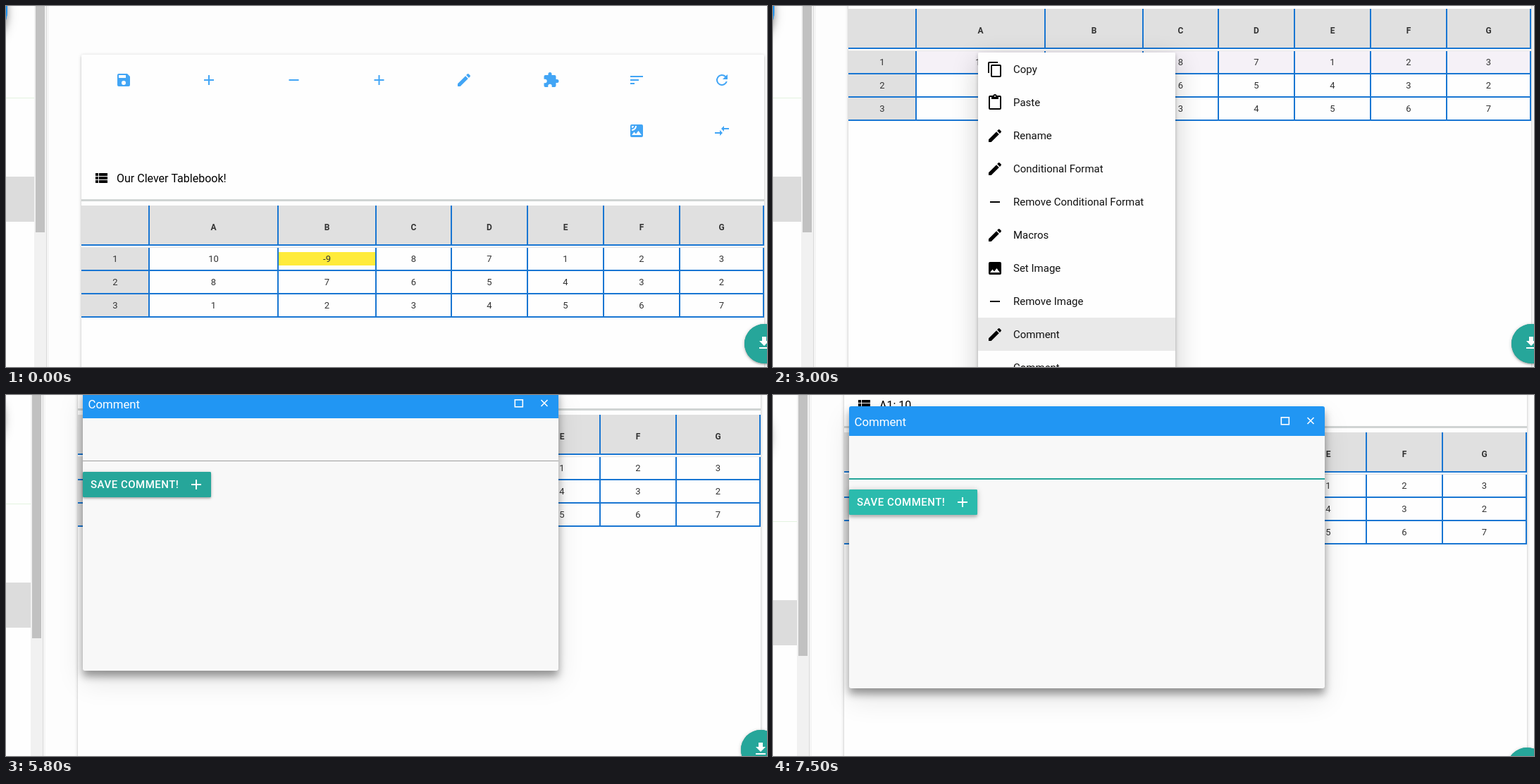
An HTML page with a canvas for the animation above (8 s loop, 1080 by 512 pixels).

```html
<!DOCTYPE html>
<html lang="en">
<head>
<meta charset="utf-8">
<title>Worksheet comment</title>
<style>
html, body { margin: 0; width: 100%; height: 100%; overflow: hidden; background: #fdfdfd; }
canvas { display: block; }
</style>
</head>
<body>
<canvas id="stage" width="1080" height="512"></canvas>
<script>
const ctx = document.getElementById('stage').getContext('2d');
const LOOP = 8000;
const BLUE = '#1976d2', TEAL = '#26a69a', GREY = '#e0e0e0';

// Icons on a 24 unit grid, filled with the even-odd rule
const SQUARE = 'M5 3h14a2 2 0 012 2v14a2 2 0 01-2 2H5a2 2 0 01-2-2V5a2 2 0 012-2z';
const HILLS = 'M8.5 13.5L5 18h14l-4.5-6-3.5 4.5z';
const icons = {
  save: 'M3 5a2 2 0 012-2h12l4 4v12a2 2 0 01-2 2H5a2 2 0 01-2-2zM5 5v4h10V5zM12 13a3 3 0 100 6 3 3 0 000-6z',
  add: 'M19 13h-6v6h-2v-6H5v-2h6V5h2v6h6z',
  remove: 'M19 13H5v-2h14z',
  edit: 'M3 17.3V21h3.7L17.8 9.9l-3.7-3.7zM20.7 7a1 1 0 000-1.4l-2.3-2.3a1 1 0 00-1.4 0l-1.9 1.8 3.8 3.8z',
  puzzle: 'M20.5 11H19V7a2 2 0 00-2-2h-4V3.5a2.5 2.5 0 00-5 0V5H4a2 2 0 00-2 2v3.8h1.5a2.7 2.7 0 010 5.4H2V20a2 2 0 002 2h3.8v-1.5a2.7 2.7 0 015.4 0V22H17a2 2 0 002-2v-4h1.5a2.5 2.5 0 000-5z',
  sort: 'M3 18h6v-2H3zM3 6v2h18V6zM3 13h12v-2H3z',
  refresh: 'M17.65 6.35A8 8 0 1019.73 14h-2.08a6 6 0 11-1.43-6.22L13 11h7V4z',
  landscape: SQUARE + HILLS + 'M5 5v3a3 3 0 003-3zM5 10v2a7 7 0 007-7h-2a5 5 0 01-5 5z',
  arrows: 'M9 14H2v2h7v3l4-4-4-4zM15 13v-3h7V8h-7V5l-4 4z',
  list: 'M4 5h4v4H4zM4 10h4v4H4zM4 15h4v4H4zM9 5h12v4H9zM9 10h12v4H9zM9 15h12v4H9z',
  image: SQUARE + HILLS,
  copy: 'M16 1H4a2 2 0 00-2 2v14h2V3h12zM8 5h11a2 2 0 012 2v14a2 2 0 01-2 2H8a2 2 0 01-2-2V7a2 2 0 012-2zM8 7v14h11V7z',
  paste: 'M5 2h4.2a3 3 0 015.6 0H19a2 2 0 012 2v16a2 2 0 01-2 2H5a2 2 0 01-2-2V4a2 2 0 012-2zM5 4v16h14V4h-2v3H7V4zM12 2a1 1 0 100 2 1 1 0 000-2z',
  download: 'M19 9h-4V3H9v6H5l7 7zM5 18v2h14v-2z'
};
for (const name in icons) icons[name] = new Path2D(icons[name]);

const toolbar = [
  ['save', 167, 105], ['add', 288, 105], ['remove', 408.5, 105], ['add', 529.5, 105],
  ['edit', 650, 105], ['puzzle', 773.5, 105], ['sort', 895, 105], ['refresh', 1016, 105],
  ['landscape', 895, 177], ['arrows', 1016, 177]
];
const menu = [
  ['copy', 'Copy'], ['paste', 'Paste'], ['edit', 'Rename'], ['edit', 'Conditional Format'],
  ['remove', 'Remove Conditional Format'], ['edit', 'Macros'], ['image', 'Set Image'],
  ['remove', 'Remove Image'], ['edit', 'Comment'], ['remove', 'Comment']
];
const columns = [107, 203, 386, 525, 632, 740, 848, 956, 1075];
const sheet = [[10, -9, 8, 7, 1, 2, 3], [8, 7, 6, 5, 4, 3, 2], [1, 2, 3, 4, 5, 6, 7]];
const panX = [-2, -5, -5, -6, -6, -6, -6];
const panY = [10, 24, 31, 36, 40, 44, 49];

const within = (t, from, to) => t >= from && t < to;
const ramp = (t, start, steps = 3) =>
  Math.max(0, Math.min(1, (Math.floor((t - start) / 100) + 1) / steps));
const mix = (a, b, k) => `rgb(${a.map((v, i) => Math.round(v + (b[i] - v) * k))})`;

function rect(x, y, w, h, color) {
  ctx.fillStyle = color;
  ctx.fillRect(x, y, w, h);
}

// Each shadow is [offsetY, blur, opacity]
function panel(x, y, w, h, radius, color, shadows) {
  ctx.beginPath();
  ctx.roundRect(x, y, w, h, radius);
  ctx.fillStyle = color;
  for (const [offset, blur, alpha] of shadows) {
    ctx.shadowColor = `rgba(0,0,0,${alpha})`;
    ctx.shadowOffsetY = offset;
    ctx.shadowBlur = blur;
    ctx.fill();
  }
  ctx.shadowColor = 'transparent';
}

function text(string, x, y, size, color, weight = 400, align = 'left', spacing = 0) {
  ctx.font = `${weight} ${size}px Roboto, sans-serif`;
  ctx.letterSpacing = spacing + 'px';
  ctx.textAlign = align;
  ctx.fillStyle = color;
  ctx.fillText(string, x, y);
}

function icon(name, x, y, color) {
  ctx.save();
  ctx.translate(x - 12, y - 12);
  ctx.fillStyle = color;
  ctx.fill(icons[name], 'evenodd');
  ctx.restore();
}

function drawSidebar() {
  rect(-10, -60, 50, 640, '#fefefe');
  rect(0, 130, 40, 1, '#e3f3e0');
  rect(-10, 242, 50, 64, '#dcdcdc');
  panel(-112, -52, 114, 114, 57, '#2196f3', [[4, 8, .25], [6, 16, .25]]);
  rect(40, -60, 17, 640, '#f1f1f1');
  rect(42, -60, 13, 381, '#c1c1c1');
  rect(57, -60, 1, 640, '#dadada');
  rect(58, -60, 3, 640, '#f5f5f5');
}

function drawTable(t) {
  const center = i => (columns[i] + columns[i + 1]) / 2;
  rect(107, 283, 968, 56, GREY);
  rect(107, 338, 969, 2, BLUE);
  rect(107, 342, 969, 1, '#e4e4e4');
  rect(107, 343, 95, 98, GREY);
  if (within(t, 500, 5700)) rect(203, 343, 872, 31, '#f5f1f7');
  rect(387, 349, 137, 19, '#ffeb3b');
  for (let row = 0; row < 3; row++) rect(107, 374 + 33 * row, 969, 2, BLUE);
  for (const x of columns.slice(1)) {
    rect(x - 1, 283, 2, 57, BLUE);
    rect(x - 1, 343, 2, 99, BLUE);
  }
  [...'ABCDEFG'].forEach((name, i) =>
    text(name, center(i + 1), 318, 12, '#333', 700, 'center'));
  sheet.forEach((values, row) => [row + 1, ...values].forEach((value, i) =>
    text(value, center(i), 363 + 33 * row, 13, '#333', 400, 'center')));
}

function drawCard(t) {
  ctx.save();
  if (t >= 1900) ctx.translate(0, -279);
  panel(107, 69, 969, 900, 2, '#fefefe', [[2, 2, .14], [1, 5, .2]]);
  for (const [name, x, y] of toolbar) icon(name, x, y, '#42a5f5');
  icon('list', 135, 244, '#000');
  text(t < 1100 ? 'Our Clever Tablebook!' : 'A1: 10', 157, 250, 16, '#000');
  rect(107, 274, 969, 3, '#d0d4d3');
  drawTable(t);
  ctx.restore();
}

function drawMenu(t) {
  const active = t < 2000 ? 5 : t < 2500 ? 6 : t < 3000 ? 7 : 8;
  panel(291, 66, 280, 560, 2, '#fefefe', [[2, 5, .25], [12, 38, .2]]);
  rect(291, 66 + 47 * active, 280, 47, '#e9e9e9');
  menu.forEach(([name, label], i) => {
    icon(name, 315, 90 + 47 * i, '#000');
    text(label, 341, 95 + 47 * i, 15, '#111');
  });
}

function drawDialog(t) {
  panel(114, -33, 675, 400, 3, '#f8f8f8', [[16, 38, .1], [8, 12, .38]]);
  panel(114, -33, 675, 42, [3, 3, 0, 0], '#2196f3', [[0, 0, 0]]);
  text('Comment', 121.5, -5, 16.8, '#fff');
  ctx.strokeStyle = '#fff';
  ctx.lineWidth = 1.6;
  ctx.strokeRect(727.3, -17.2, 11, 10);
  ctx.beginPath();
  ctx.moveTo(764.5, -17);
  ctx.lineTo(773.5, -8);
  ctx.moveTo(773.5, -17);
  ctx.lineTo(764.5, -8);
  ctx.stroke();

  const focus = t < 5700 ? ramp(t, 4600) : ramp(t, 7000);
  rect(114, 69, 675, 1, mix([158, 158, 158], [38, 166, 154], focus));
  rect(114, 70, 675, 1, `rgba(38,166,154,${focus})`);
  if (within(t, 4600, 5100) || within(t, 5500, 5700) || within(t, 7000, 7400))
    rect(114, 38, 1, 18, '#222');

  const hover = ramp(t, 6600);
  const lift = hover + .5 * ramp(t, 7400, 2) + (t < 5700 ? .4 * ramp(t, 3900) : 0);
  panel(114, 85, 182, 36, 2, mix([38, 166, 154], [43, 187, 173], hover),
    [[2 + lift, 2 + lift, .16], [1, 5 + 2 * lift, .22]]);
  text('SAVE COMMENT!', 125, 108, 15, '#fff', 500, 'left', .5);
  icon('add', 275, 103, '#fff');
}

function draw(t) {
  rect(0, 0, 1080, 512, '#fdfdfd');
  ctx.save();
  if (t >= 5700) {
    const step = Math.min(6, Math.floor((t - 5700) / 100));
    ctx.translate(panX[step], panY[step]);
  }
  drawSidebar();
  drawCard(t);
  panel(1048, 451, 56, 56, 28, TEAL, [[2, 2, .14], [1, 5, .25]]);
  icon('download', 1076, 478, '#fff');
  if (within(t, 1900, 3400)) drawMenu(t);
  if (t >= 3400) drawDialog(t);
  ctx.restore();
}

const start = performance.now();
function tick() {
  draw((performance.now() - start) % LOOP);
  requestAnimationFrame(tick);
}
tick();
</script>
</body>
</html>
```
